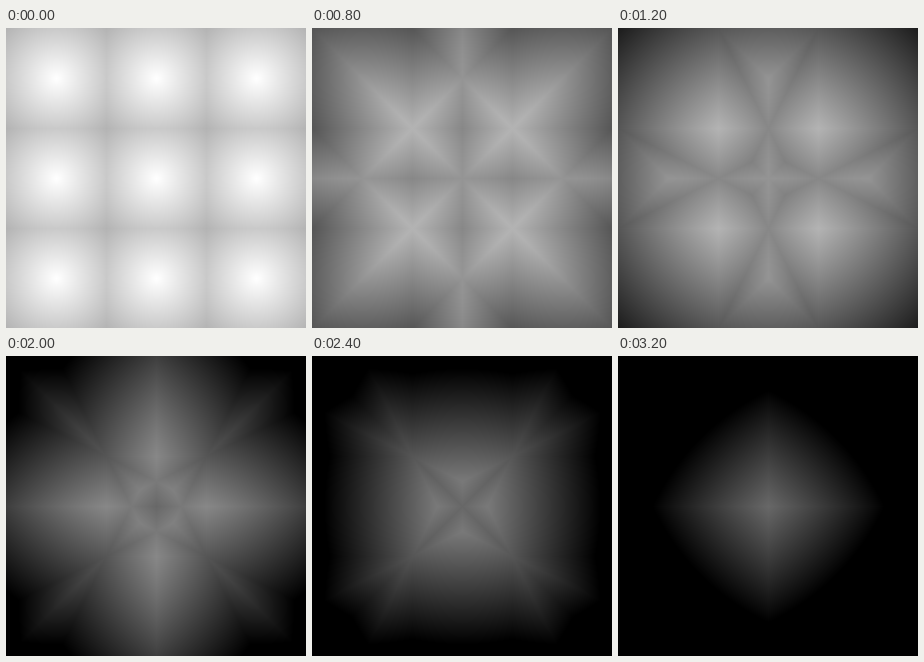
These frames come from a looping animation (300 px wide and 300 px high, 3.6 s). An HTML page with a canvas:

```html
<!DOCTYPE html>
<html lang="en">
<head>
<meta charset="utf-8">
<title>Cellular distance field</title>
<style>
  html, body { margin: 0; width: 100%; height: 100%; overflow: hidden; background: #000; }
  canvas { display: block; width: 100vw; height: 100vh; }
</style>
</head>
<body>
<canvas id="stage" width="300" height="300"></canvas>
<script>
const SIZE = 300;
const STEP = 400;
const REACH = 238; // distance at which the shade reaches black
const GRID = [50, 150, 250];
const points = GRID.flatMap(y => GRID.map(x => [x, y]));
const ctx = document.getElementById("stage").getContext("2d");

// Layer n shades each pixel by the distance to its (n + 1)th nearest point.
const layers = points.map(() => ctx.createImageData(SIZE, SIZE));

function buildLayers() {
  const dist = new Float64Array(points.length);
  for (let y = 0; y < SIZE; y++) {
    for (let x = 0; x < SIZE; x++) {
      points.forEach(([px, py], i) => { dist[i] = Math.hypot(x - px, y - py); });
      dist.sort();
      const at = (y * SIZE + x) * 4;
      layers.forEach(({ data }, n) => {
        data[at] = data[at + 1] = data[at + 2] = 255 * (1 - dist[n] / REACH);
        data[at + 3] = 255;
      });
    }
  }
}

let shown = -1;

function draw(time) {
  const n = Math.floor(Math.max(0, time - start) / STEP) % layers.length;
  if (n !== shown) {
    ctx.putImageData(layers[n], 0, 0);
    shown = n;
  }
  requestAnimationFrame(draw);
}

buildLayers();
const start = performance.now();
draw(start);
</script>
</body>
</html>
```
